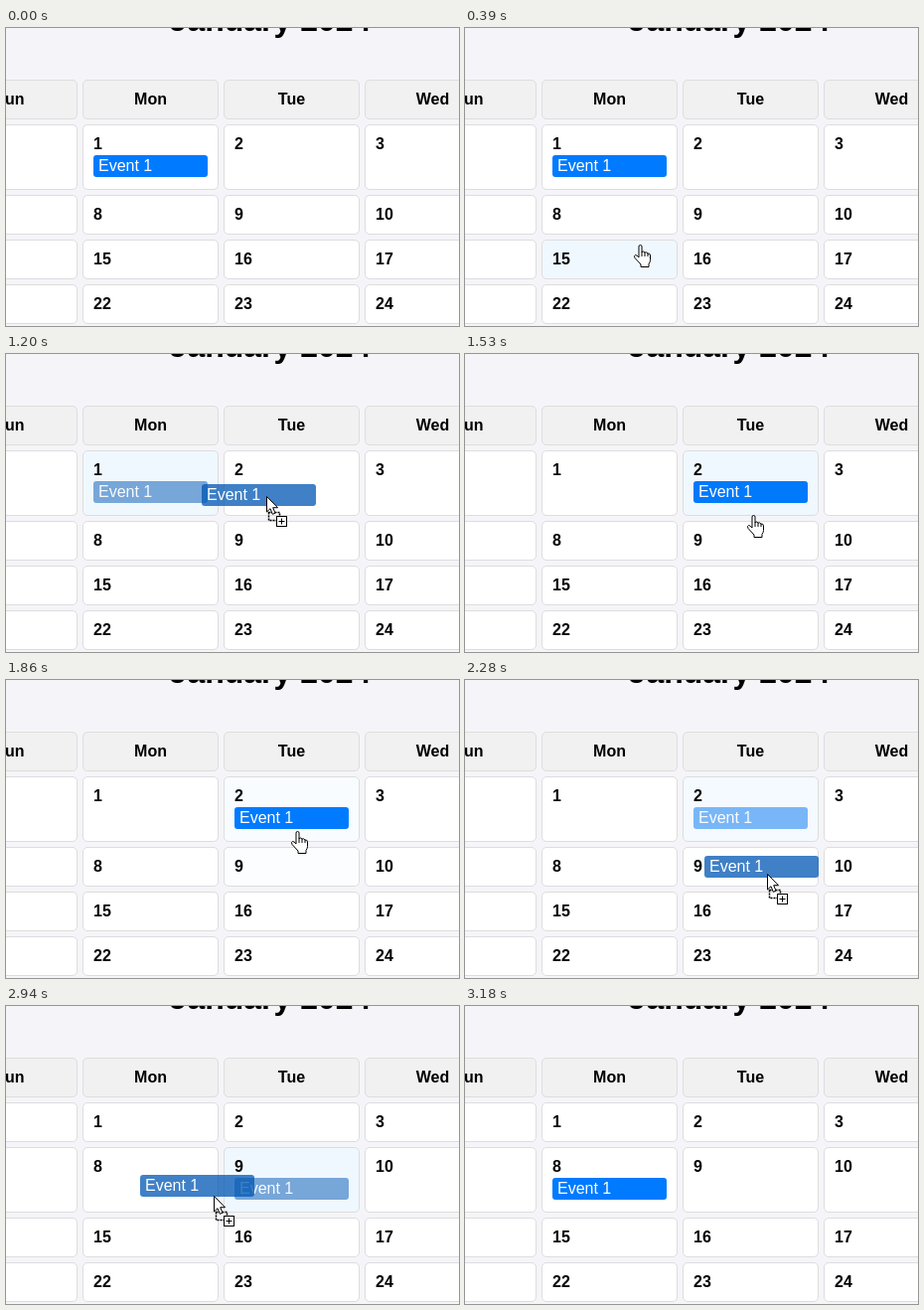
Animation, 456 px wide and 300 px high, one loop 4080 ms. Source, as an HTML page:

```html
<!DOCTYPE html>
<html lang="en">
<head>
<meta charset="utf-8">
<title>Calendar drag and drop</title>
<style>
  html, body { margin: 0; width: 100%; height: 100%; overflow: hidden; }
  body {
    position: relative; background: #f5f5f9; color: #000;
    font: 16px/18px "Liberation Sans", Arial, sans-serif;
  }
  h1 {
    position: absolute; left: 66px; top: -26px; width: 400px; margin: 0;
    font-size: 32px; line-height: 37px; text-align: center;
  }
  #grid {
    position: absolute; left: -65px; top: 52px;
    display: grid; grid-template-columns: repeat(4, 137px); gap: 5px;
  }
  .cell {
    box-sizing: border-box; padding: 10px; font-weight: bold;
    border: 1px solid #ddd; border-radius: 5px; background: #fff;
  }
  .name { background: #f1f1f1; text-align: center; }
  .event {
    margin: 2px 0; padding: 2px 5px; border-radius: 3px;
    color: #fff; font-weight: normal;
  }
  #ghost {
    position: absolute; left: 0; top: 0; width: 105px; margin: 0;
    background: #0056b3; opacity: .75;
  }
  svg { position: absolute; left: 0; top: 0; width: 456px; height: 300px; }
  svg path, svg rect { fill: #fff; stroke: #000; stroke-width: 1; }
  svg .dashed { fill: none; stroke-width: 1.5; stroke-dasharray: 2 1; }
</style>
</head>
<body>
<h1>January 2024</h1>
<div id="grid"></div>
<div class="event" id="ghost">Event 1</div>
<svg viewBox="0 0 456 300">
  <g id="cursor">
    <g id="move">
      <path d="M0-11L4.5-6.5H1.5V-1.5H6.5V-4.5L11 0L6.5 4.5V1.5H1.5V6.5H4.5L0 11L-4.5 6.5H-1.5V1.5H-6.5V4.5L-11 0L-6.5-4.5V-1.5H-1.5V-6.5H-4.5Z"/>
    </g>
    <g id="hand" transform="translate(-6 -1)">
      <path d="M5 13V2Q5 .5 6.5 .5T8 2V7.5Q9.5 6.3 11 8Q12.7 7.2 14 9Q16.5 8.7 16.5 11V15.5Q16.5 17.5 15 19.5V22.5H7V20L1 13.5Q-.3 11.2 1.5 10.5Q3 10.5 5 13Z"/>
      <path d="M8 7V12M11 8V12M14 9V12"/>
    </g>
    <g id="copy">
      <rect class="dashed" x="2.5" y="16.5" width="11" height="8"/>
      <path d="M.5 .5V16L4 12.7L6.3 18.3L9 17.2L6.7 11.7H11.5Z"/>
      <rect x="10.5" y="20.5" width="10" height="10"/>
      <path d="M15.5 22.5V28.5M12.5 25.5H18.5"/>
    </g>
  </g>
</svg>
<script>
const LOOP = 4080, FADE = 100, SAMPLES = 20;
const $ = id => document.getElementById(id);

// Pointer key points
const path = [
  { t: 120, x: 200, y: 306 }, { t: 640, x: 153, y: 140 },
  { t: 870, x: 153, y: 140 }, { t: 1200, x: 262, y: 143 },
  { t: 1410, x: 288, y: 146 }, { t: 1710, x: 294, y: 188 },
  { t: 1890, x: 293, y: 146 }, { t: 2280, x: 304, y: 195 },
  { t: 2370, x: 304, y: 195 }, { t: 2520, x: 304, y: 222 },
  { t: 2660, x: 304, y: 194 }, { t: 2760, x: 304, y: 194 },
  { t: 3000, x: 178, y: 190 }, { t: 3085, x: 192, y: 306 }
];
const drags = [
  { grab: 870, drop: 1410, to: 2 },
  { grab: 1890, drop: 2370, to: 9 },
  { grab: 2760, drop: 3000, to: 8 }
];

const cells = [];
function addCell(text, kind) {
  const cell = document.createElement("div");
  cell.className = "cell " + kind;
  cell.textContent = text;
  $("grid").append(cell);
  return cell;
}
["Sun", "Mon", "Tue", "Wed"].forEach(day => addCell(day, "name"));
for (let week = 0; week < 4; week++)
  for (let col = 0; col < 4; col++) {
    const day = week * 7 + col;
    cells[day] = addCell(day || "\u00a0", "day");
  }
const event = document.createElement("div");
event.className = "event";
event.textContent = "Event 1";

const mix = (a, b, k) => `rgb(${a.map((v, i) => Math.round(v + (b[i] - v) * k))})`;
const place = (el, x, y) => el.style.transform = `translate(${Math.round(x)}px,${Math.round(y)}px)`;
const show = (el, on) => el.style.display = on ? "" : "none";
const dragAt = t => drags.find(d => t >= d.grab && t < d.drop);
const eventDay = t => drags.reduce((day, d) => t >= d.drop ? d.to : day, 1);
const eventPos = day => ({ x: 142 * (day % 7) - 54, y: 128 + 45 * Math.floor(day / 7) });

function pointer(t) {
  const i = path.findIndex(p => p.t > t);
  if (i < 1) return i ? path[path.length - 1] : path[0];
  const a = path[i - 1], b = path[i], k = (t - a.t) / (b.t - a.t);
  return { x: a.x + (b.x - a.x) * k, y: a.y + (b.y - a.y) * k };
}

// The row holding the event is taller than the others.
function dayAt(p, tallWeek) {
  let top = 97;
  for (let week = 0; week < 4; week++) {
    const height = week === tallWeek ? 66 : 40;
    if (p.y >= top && p.y < top + height)
      return week * 7 + Math.floor((p.x + 65) / 142);
    top += height + 5;
  }
}

// Hover stays frozen while dragging.
function hoverAt(t) {
  const drag = dragAt(t);
  const time = drag ? drag.grab - 1 : t;
  const p = pointer(time), day = eventDay(time), pos = eventPos(day);
  return {
    day: dayAt(p, Math.floor(day / 7)),
    event: p.x >= pos.x && p.x < pos.x + 115 && p.y >= pos.y && p.y < pos.y + 22
  };
}

// A linear fade equals the share of the last FADE ms spent hovering.
function hoverShares(t) {
  const shares = { days: {}, event: 0 };
  for (let i = 0; i < SAMPLES; i++) {
    const hover = hoverAt(t - FADE * i / SAMPLES);
    shares.days[hover.day] = (shares.days[hover.day] || 0) + 1 / SAMPLES;
    if (hover.event) shares.event += 1 / SAMPLES;
  }
  return shares;
}

function render(t) {
  const drag = dragAt(t), day = eventDay(t), p = pointer(t);
  const shares = hoverShares(drag ? drag.grab - 1 : t);

  cells.forEach((cell, d) => {
    cell.style.background = mix([255, 255, 255], [240, 248, 255], shares.days[d] || 0);
  });
  if (event.parentNode !== cells[day]) cells[day].append(event);
  event.style.background = mix([0, 123, 255], [0, 86, 179], shares.event);
  event.style.opacity = drag ? .5 : 1;

  show($("ghost"), drag);
  if (drag) {
    const from = pointer(drag.grab), pos = eventPos(day);
    place($("ghost"), pos.x + p.x - from.x, pos.y + p.y - from.y);
  }

  const icon = drag ? "copy" : hoverAt(t).event ? "move" : "hand";
  for (const id of ["copy", "move", "hand"]) show($(id), id === icon);
  place($("cursor"), p.x, p.y);
}

const start = performance.now();
function tick() {
  render((performance.now() - start) % LOOP);
  requestAnimationFrame(tick);
}
tick();
</script>
</body>
</html>
```
